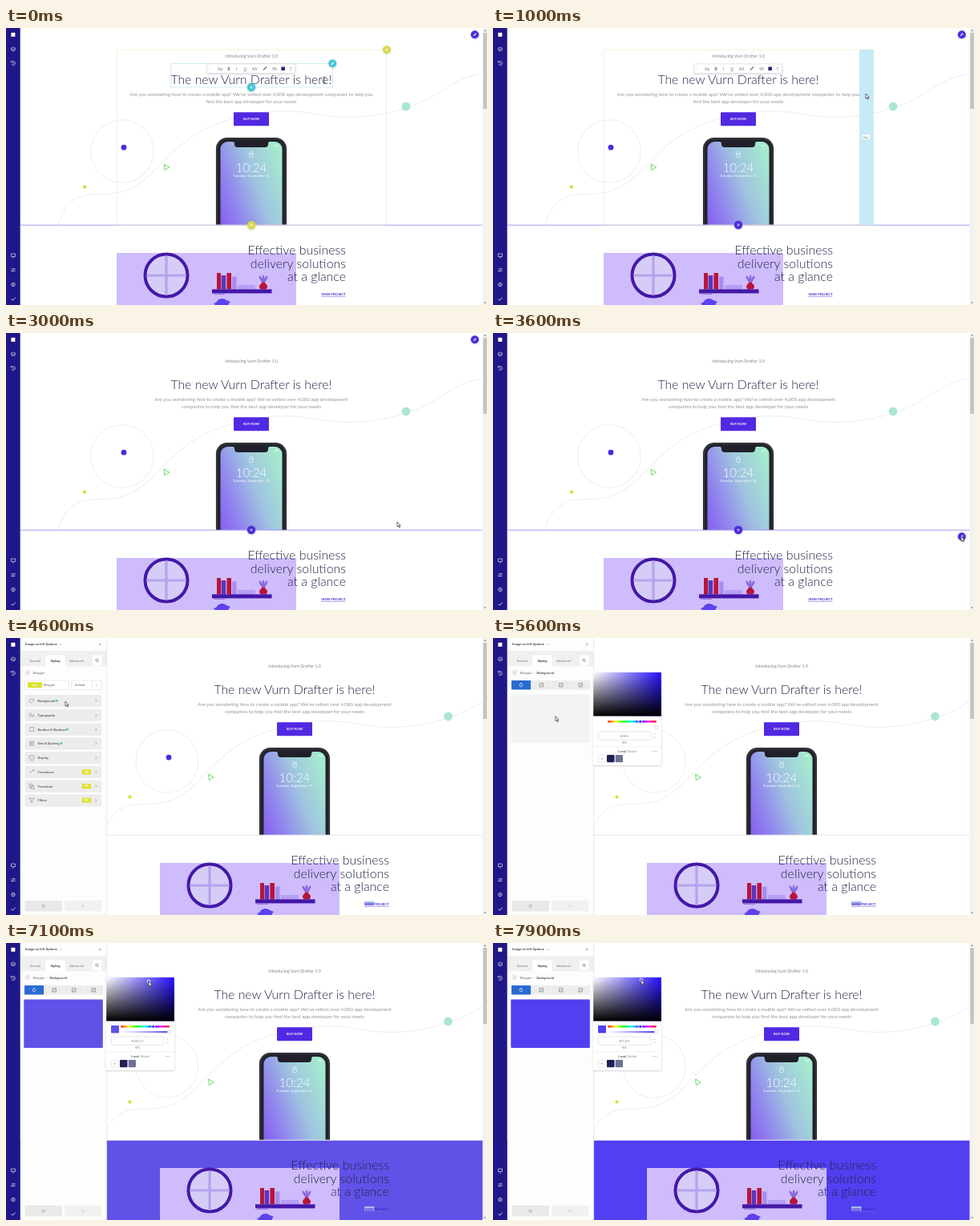
Animation, 600 px wide and 346 px high, one loop 8000 ms. Source, as an HTML page:

```html
<!DOCTYPE html>
<html lang="en">
<head>
<meta charset="utf-8">
<title>Page builder</title>
<style>
html, body { margin: 0; width: 100%; height: 100%; overflow: hidden; background: #fff; }
svg { display: block; width: 100vw; height: 100vh; }
text { font-family: Lato, "Open Sans", sans-serif; }
.ui text { font-family: Roboto, Inter, sans-serif; }
</style>
</head>
<body>
<svg id="stage" viewBox="0 0 600 346" preserveAspectRatio="none"></svg>
<script>
const LOOP = 8000;
const OPEN_PANEL = 3700, OPEN_BACKGROUND = 4950, OPEN_PICKER = 5500, PICK = 5900;
const stage = document.getElementById('stage');

const rect = (x, y, w, h, fill, r = 0, more = '') =>
  `<rect x="${x}" y="${y}" width="${w}" height="${h}" fill="${fill}" rx="${r}" ${more}/>`;
const circle = (x, y, r, fill, more = '') => `<circle cx="${x}" cy="${y}" r="${r}" fill="${fill}" ${more}/>`;
const line = (d, stroke, w = .6, more = '') =>
  `<path d="${d}" fill="none" stroke="${stroke}" stroke-width="${w}" ${more}/>`;
const text = (x, y, size, fill, body, anchor = 'start', weight = 400, more = '') =>
  `<text x="${x}" y="${y}" font-size="${size}" fill="${fill}" text-anchor="${anchor}" font-weight="${weight}" ${more}>${body}</text>`;
const group = (id, body, more = '') => `<g id="${id}" ${more}>${body}</g>`;
const plus = (x, y, fill) => circle(x, y, 5.2, fill, 'filter="url(#soft)"') +
  line(`M${x - 1.6} ${y}h3.2M${x} ${y - 1.6}v3.2`, '#fff', .7);
const pencil = (x, y, fill) => circle(x, y, 5, fill, 'filter="url(#soft)"') +
  line(`M${x - 1.4} ${y + 1.4}l2.8 -2.8`, '#fff', 1.3);

const defs = `<defs>
  <filter id="soft" x="-50%" y="-50%" width="200%" height="200%"><feDropShadow dx="0" dy=".7" stdDeviation="1.2" flood-opacity=".22"/></filter>
  <linearGradient id="screen" x1="0" y1=".85" x2="1" y2=".15">
    <stop offset="0" stop-color="#8452f2"/><stop offset=".32" stop-color="#9187ed"/>
    <stop offset=".62" stop-color="#9fc3e0"/><stop offset="1" stop-color="#a5ebce"/></linearGradient>
  <linearGradient id="tint"><stop offset="0" stop-color="#fff"/><stop offset="1" stop-color="#2410ff"/></linearGradient>
  <linearGradient id="shade" x2="0" y2="1"><stop offset="0" stop-opacity="0"/><stop offset="1"/></linearGradient>
  <linearGradient id="hue">${['#f00', '#ff0', '#0f0', '#0ff', '#00f', '#f0f', '#f00']
    .map((c, i) => `<stop offset="${i / 6}" stop-color="${c}"/>`).join('')}</linearGradient>
  <linearGradient id="alpha"><stop offset="0" stop-color="#fff"/><stop id="alphaEnd" offset="1"/></linearGradient>
  <clipPath id="hero"><rect x="-60" width="720" height="246"/></clipPath>
</defs>`;

const decor = group('decor',
  line('M65 246C70 226 82 209 107 208C141 207 157 206 184 179C211 151 232 129 274 116C316 102 354 101 389 108C434 116 475 109 510 96C548 81 557 63 593 57', '#e4e4e6', .7) +
  circle(145, 154, 39.3, 'none', 'stroke="#e6e6e8" stroke-width=".7"') +
  circle(147, 149.2, 3.4, '#5028df') +
  rect(96, 196.6, 3.9, 3.8, '#d8df3a', .8) +
  line('M197.2 170L203.6 174L197.8 177.6Z', '#54d651', .9) +
  circle(499, 98, 5.4, '#aae6d0'));

const phone = `<g clip-path="url(#hero)">` +
  rect(262, 137, 88, 150, '#20202a', 14, 'filter="url(#soft)"') +
  rect(263.2, 138.2, 85.6, 150, 'none', 13, 'stroke="#54545e" stroke-width=".6"') +
  rect(267.5, 142, 77, 150, 'url(#screen)', 9) +
  '<path d="M283 142h46q-2 0 -2 3q0 4 -4 4h-34q-4 0 -4 -4q0 -3 -2 -3z" fill="#20202a"/>' +
  line('M335 147h5', '#fff', 1, 'opacity=".8"') +
  line('M304 158v-1.6a2 2 0 0 1 4 0v1.6', '#fff', .6) +
  circle(306, 159.5, 2.5, 'none', 'stroke="#fff" stroke-width=".6"') +
  text(306, 179.7, 15.2, '#fff', '10:24', 'middle', 300) +
  text(306, 186.3, 4.5, '#fff', 'Tuesday, September 11', 'middle') + '</g>';

const GREY = '#94949d', INK = '#25254a';
const paragraph = (id, lines) => group(id,
  lines.map((s, i) => text(306, 85 + 8.6 * i, 6.08, GREY, s, 'middle')).join(''));

const copy =
  text(306, 37, 5.3, '#858591', 'Introducing Vurn Drafter 1.0', 'middle') +
  text(306, 70, 15.8, INK, 'The new Vurn Drafter is here!', 'middle', 300) +
  paragraph('wide', ['Are you wondering how to create a mobile app? We’ve vetted over 4,000 app development companies to help you', 'find the best app developer for your needs']) +
  paragraph('narrow', ['Are you wondering how to create a mobile app? We’ve vetted over 4,000 app development', 'companies to help you find the best app developer for your needs']) +
  rect(284, 105.2, 44, 17, '#5129e2', 1) +
  text(306, 115.2, 4.1, '#fff', 'BUY NOW', 'middle', 700);

const leaf = turn => `<ellipse cx="321" cy="313" rx="1.4" ry="4.6" fill="#8a67dc" transform="rotate(${turn} 321 319)"/>`;
const section =
  rect(-100, 246.5, 760, 100, '#fff', 0, 'id="sectionFill"') +
  rect(138, 281, 224, 66, '#cfbcfd') +
  circle(200, 309, 26.5, '#d5cdf8', 'stroke="#4318a6" stroke-width="4"') +
  line('M200 284.5v49M175.5 309h49', '#b6a2ee', 3.2) +
  rect(263, 306, 5, 20.5, '#b8143a') + rect(268.6, 309, 5.6, 17.5, '#5b35bd') +
  rect(275.4, 306, 5.6, 20.5, '#b8143a') + rect(282, 310.5, 5.5, 16, '#a88cf0') +
  rect(289, 321, 22, 5.5, '#b69ef5') +
  [-28, 0, 28].map(leaf).join('') +
  '<path d="M319 317.5h4q0 2 2 3q2.500 3 -1 6h-6q-3.500 -3 -1 -6q2 -1 2 -3z" fill="#b8143a"/>' +
  rect(257, 326.4, 74.5, 5, '#4318a6') + line('M259 332.2h14', '#8f70df', 1.4) +
  '<path d="M259 344q4 -1 5 -4q6 -4 11 0l5 2q-2 1 -3 5h-15z" fill="#5b42ec"/>' +
  [['Effective business', 283], ['delivery solutions', 299.8], ['at a glance', 316.2]]
    .map(([s, y]) => text(424, y, 15.9, INK, s, 'end', 300)).join('') +
  rect(393, 329, 12.5, 5.2, '#a9b9f0', 0, 'id="selection"') +
  text(423.5, 333.6, 4.25, '#4a27cf', 'VIEW PROJECT', 'end', 700) +
  line('M393 335.4h30.5', '#7d66dd', .6);

const tools = group('tools',
  rect(251, 45, 109.500, 11.4, '#fff', 1, 'stroke="#dcdce2" stroke-width=".6" filter="url(#soft)"') +
  [['⁝', 255], ['Aa', 267], ['B', 278, 'font-weight="700"'], ['I', 287.500, 'font-style="italic"'],
   ['U', 298, 'text-decoration="underline"'], ['AA', 310], ['99', 335], ['Ξ', 355]]
    .map(([s, x, more]) => text(x, 52.7, 5, '#70707c', s, 'middle', more && more.includes('weight') ? 700 : 400,
      more && !more.includes('weight') ? more : '')).join('') +
  line('M321 52.500l4 -4', '#70707c', 1.2) + rect(343.4, 48.500, 4.500, 4.500, '#29217e'), 'class="ui"');

const overlays =
  line('M18 246.2H594', '#9f8ff0', .9, 'id="sectionLine"') +
  rect(138, 27, 336.500, 219, 'none', 0, 'id="column" stroke="#ebe9c6" stroke-width=".7"') +
  group('padding', rect(457, 27, 17.500, 219, '#c5ebf7', 0, 'id="paddingFill"') +
    rect(460.500, 133.300, 9.500, 6, '#fff', 1) + text(465.2, 137.800, 3.300, '#777', '50px', 'middle'), 'class="ui"') +
  rect(205.500, 44.500, 202, 29.500, 'none', 0, 'id="headingBox" stroke="#bfe5f0" stroke-width=".7"') +
  tools +
  group('headingTools', pencil(407.300, 44.300, '#45c6d8') + plus(306, 74, '#45c6d8')) +
  group('columnTools', pencil(475, 27, '#d9da4b') + plus(306, 246.300, '#d9da4b')) +
  group('sectionPlus', plus(306, 246, '#4c2edf')) +
  group('sectionPencil', pencil(584.800, 8.200, '#4c2edf'));

const sideIcons =
  rect(6.4, 5.800, 5, 5, '#fff') +
  line('M6 25.500l3 -1.700l3 1.700l-3 1.700zM6 27.200l3 1.700l3 -1.700', '#fff') +
  line('M7 42.500a2.500 2.500 0 1 1 -.3 2.500M6.300 41v1.800h1.800M9 42.800v1.500l1 .8', '#fff') +
  line('M6.500 282h5v3.500h-5zM8 287h2', '#fff') +
  line('M6.300 301h5.400M6.300 303.500h5.400M10 300v2M8 302.500v2', '#fff') +
  circle(9, 320.500, 2.200, 'none', 'stroke="#fff" stroke-width=".7"') + circle(9, 320.500, .7, '#fff') +
  line('M6.600 338.500l1.700 1.700l3.300 -3.600', '#fff', .8);

const chevron = (x, y) => line(`M${x} ${y - 1.500}l1.500 1.500l-1.500 1.500`, '#777');
const down = (x, y) => line(`M${x - 1.300} ${y - .6}l1.300 1.300l1.300 -1.300`, '#777', .5);

// Row: label, end of label when it carries a green dot, paid feature flag
const rows = [['Background', 63.500], ['Typography'], ['Borders &amp; Shadows', 76.500], ['Size &amp; Spacing', 69],
  ['Display'], ['Transitions', 0, true], ['Transform', 0, true], ['Filters', 0, true]];
const glyphs = ['M29 79q0 -3 3 -3t3 2.500q-1 1 -2 .7q-1 2 -2 1.700q-2 0 -2 -1.900z', 'M29 81l1.600 -5l1.600 5M33 81l1.200 -3.500l1.200 3.500',
  'M29.500 76h5v5h-5z', 'M29.500 76h5v5h-5zM31 77.500h2v2h-2z', 'M29 76h6v4h-6zM30 82h4', 'M29 80l6 -4M33 76h2v2',
  'M29 76h4v4h-4zM31 78h4v4h-4z', 'M29 76h6l-2.300 2.800v3l-1.400 -.8v-2.200z'];
const row = ([label, dot, paid], i) => `<g transform="translate(0 ${17.750 * i})">` +
  rect(23.500, 71, 95.500, 15.200, '#ececec', 1.500) + line(glyphs[i], '#8c8c92', .6) +
  text(39.500, 80.100, 4.100, '#55555c', label, 'start', 500) +
  (dot ? circle(dot, 78.400, 1.400, '#4fcb80') : '') +
  (paid ? rect(95, 75.600, 11, 6, '#dfe122', 1) + text(100.500, 79.800, 2.900, '#fff', 'PRO', 'middle', 700) : '') +
  chevron(111.500, 78.600) + '</g>';

const options = group('options',
  rect(23.500, 53, 55, 11.500, '#fff', 1, 'stroke="#dedede" stroke-width=".6"') +
  rect(27, 55.200, 18, 7, '#dce12c', 1) + text(36, 59.800, 2.900, '#fff', 'class', 'middle', 500) +
  text(46.500, 60.200, 4, '#666', 'Wrapper') +
  rect(82, 53, 37, 11.500, '#fff', 1, 'stroke="#dedede" stroke-width=".6"') + line('M107.500 53v11.500', '#dedede') +
  text(86, 60.200, 4, '#666', 'default') + down(113, 58.700) + rows.map(row).join(''));

const background = group('background',
  text(51, 44.600, 3.900, '#777', '›') + text(54.500, 44.600, 4, '#44444c', 'Background', 'start', 500) +
  [23, 48, 72.500, 97].map((x, i) => rect(x, 53, 24.200, 11.500, i ? '#ececec' : '#2a6bd2', 1) +
    (i ? line(`M${x + 10} 56.500h4.500v4.500h-4.500zM${x + 10.500} 60.500l3.500 -3`, '#777') : line('M35 56l1.500 2.300a1.700 1.700 0 1 1 -3 0z', '#fff', .7))).join('') +
  rect(22.300, 70.500, 98.500, 60.500, '#f3f3f3', 1, 'id="preview"'));

const panel = group('panel',
  rect(17.500, 0, 108.300, 346, '#fdfdfd') + rect(17.500, 16, 108.300, 19.300, '#f0f0f1') +
  line('M125.700 0V346', '#dcdce0') +
  text(24, 9.400, 4.150, '#3c3c44', 'Image on left Options', 'start', 500) + down(68.500, 8) +
  line('M115.600 6.600l2.800 2.800m0 -2.800l-2.800 2.800', '#777', .5) +
  rect(49.300, 21.500, 24.500, 14, '#fff', 1) + rect(108, 21.500, 11.500, 12.500, '#fff', 1) +
  text(36.500, 29.600, 4, '#777', 'General', 'middle') + text(61.500, 29.600, 4, '#33333c', 'Styling', 'middle', 500) +
  text(88, 29.600, 4, '#777', 'Advanced', 'middle') +
  circle(113.300, 27.600, 1.500, 'none', 'stroke="#555" stroke-width=".6"') + line('M114.400 28.700l1.300 1.300', '#555') +
  rect(23.700, 39.800, 6.600, 6.600, '#f3eaf0', 2) + line('M27.500 41.700l-1.300 1.400l1.300 1.400', '#999', .5) +
  text(33.500, 44.600, 4, '#666', 'Wrapper') + options + background +
  rect(23.500, 328, 46.500, 13.500, '#e9e9ea', 1) + rect(73, 328, 46, 13.500, '#f1f1f2', 1) +
  circle(46.700, 334.800, 1.600, 'none', 'stroke="#999" stroke-width=".7"') +
  circle(96, 334.800, 1.600, 'none', 'stroke="#d0d0d0" stroke-width=".7"'), 'class="ui"');

const picker = group('picker',
  rect(124.800, 43, 85.200, 116, '#fff', 1.500, 'filter="url(#soft)"') +
  rect(125.200, 43, 84.600, 54.500, 'url(#tint)') + rect(125.200, 43, 84.600, 54.500, 'url(#shade)') +
  circle(0, 0, 1.900, 'none', 'id="ring" stroke="#fff" stroke-width=".8"') +
  rect(131, 103, 10, 9.500, '#fff', 1, 'id="swatch"') +
  rect(143, 103.300, 61, 2.200, 'url(#hue)', 1) + circle(183.700, 104.400, 2.100, '#4a35ea', 'stroke="#fff" stroke-width=".9"') +
  rect(143, 110, 61, 2.200, 'url(#alpha)', 1) +
  circle(203.500, 111.100, 2.300, '#fff', 'stroke="#c5c5cd" stroke-width=".6"') +
  rect(131.200, 117, 65.600, 10.300, '#fff', 1, 'stroke="#dcdce0" stroke-width=".7"') +
  text(164, 123.700, 4, '#85858c', '', 'middle', 400, 'id="hex"') +
  line('M200.200 120.700l1.200 -1.300l1.200 1.300M200.200 123.500l1.200 1.300l1.200 -1.300', '#999', .5) +
  text(164, 132.300, 3.300, '#888', 'HEX', 'middle') + line('M125 135.700h85', '#e8e8ec') +
  text(166, 143, 4, '#55555c', 'Local', 'end', 500) + text(167.500, 143, 4, '#888', 'Global') +
  [199.500, 201.500, 203.500].map(x => circle(x, 141.500, .5, '#888')).join('') +
  rect(131.300, 146.300, 8.700, 8.700, '#fff', 1, 'stroke="#dcdce0" stroke-width=".6"') +
  line('M134.500 150.700h2.400M135.700 149.500v2.400', '#888', .5) +
  rect(142, 146, 9.500, 9.200, '#211e58', 1) + rect(152.700, 146, 9.300, 9.200, '#6d7196', 1), 'class="ui"');

const scrollbar = rect(594.500, 0, 5.500, 346, '#f2f2f2') + rect(595.300, 6, 4.500, 95, '#c2c2c4') +
  '<path d="M596 3.800l1.500 -1.700l1.500 1.700zM596 342.500l1.500 1.700l1.500 -1.700z" fill="#777"/>';

const pointers =
  group('arrow', '<path d="M0 0v6l1.400 -1.200l1 2.300l1 -.4l-1 -2.200h1.800z" fill="#fff" stroke="#222" stroke-width=".65"/>') +
  group('beam', line('M-1.500 -4h3M0 -4v7.500M-1.500 3.500h3', '#333', .7));

stage.innerHTML = defs + rect(0, 0, 600, 346, '#fff') +
  group('page', section + decor + phone + copy) + overlays + scrollbar + panel + picker +
  rect(0, 0, 17.700, 346, '#1f1788') + sideIcons + pointers;

const el = Object.fromEntries([...stage.querySelectorAll('[id]')].map(n => [n.id, n]));
const show = (id, on) => { el[id].style.display = on ? '' : 'none'; };
const set = (id, name, value) => el[id].setAttribute(name, value);

// Pointer route: time, x, y
const route = [[0, 397, 65], [250, 399, 66], [900, 465, 82], [1250, 465, 82], [2000, 450, 84], [2250, 452, 90],
  [3000, 488, 236], [3400, 584, 254], [3750, 584, 254], [4500, 74, 79], [4950, 74, 79],
  [5300, 74, 100], [5550, 74, 100], [5900, 143, 60], [6300, 154, 53], [7100, 178, 48], [7900, 185, 46], [8000, 185, 46]];

function pointerAt(t) {
  const i = Math.max(1, route.findIndex(p => p[0] > t));
  const [a, b] = [route[i - 1], route[i]];
  const u = (t - a[0]) / (b[0] - a[0]);
  const k = t < PICK ? u * u * (3 - 2 * u) : u;
  return [a[1] + (b[1] - a[1]) * k, a[2] + (b[2] - a[2]) * k];
}

function pickColor(x, y) {
  const s = Math.min(1, Math.max(0, (x - 126) / 80));
  const v = 255 * Math.min(1, 1 - (y - 43) / 54);
  const low = v * (1 - s);
  return '#' + [low + (v - low) * .1, low, v].map(c => Math.round(c).toString(16).padStart(2, '0')).join('');
}

function draw(t) {
  const [x, y] = pointerAt(t);
  const open = t >= OPEN_PANEL, inBackground = t >= OPEN_BACKGROUND;
  const inHeading = t < 1000 && x < 408, inColumn = t < 2600 && x < 474 && y < 246;
  const onPadding = inColumn && (t >= 900 || x >= 457);
  const grow = t < 1250 ? 0 : Math.max(0, Math.min(15, 465 - x));
  const color = t >= PICK ? pickColor(x, y) : '#ffffff';

  set('page', 'transform', open ? 'translate(54 0)' : '');
  set('decor', 'transform', open ? 'translate(3.500 0) scale(.99 1)' : '');
  show('wide', grow < 6 && t < 2000);
  show('narrow', grow >= 6 || t >= 2000);

  show('headingBox', inHeading);
  show('headingTools', inHeading);
  show('tools', inColumn);
  show('column', inColumn);
  show('columnTools', inColumn && !onPadding);
  show('padding', onPadding);
  set('paddingFill', 'x', 457 - grow);
  set('paddingFill', 'width', 17.5 + grow);
  show('sectionPlus', !open && !(inColumn && !onPadding));
  show('sectionPencil', !open);
  set('sectionPencil', 'transform', t >= 3150 ? 'translate(0 246)' : '');
  set('sectionLine', 'stroke', open ? '#e4e4e8' : '#9f8ff0');
  show('selection', open);

  show('panel', open);
  show('options', !inBackground);
  show('background', inBackground);
  show('picker', t >= OPEN_PICKER);
  set('sectionFill', 'fill', color);
  set('preview', 'fill', t >= PICK ? color : '#f3f3f3');
  set('swatch', 'fill', color);
  set('alphaEnd', 'stop-color', color);
  el.hex.textContent = color;
  show('ring', t >= PICK);
  set('ring', 'transform', `translate(${x} ${y})`);

  show('beam', inHeading);
  show('arrow', !inHeading);
  set('beam', 'transform', `translate(${x} ${y})`);
  set('arrow', 'transform', `translate(${x} ${y})`);
}

const start = performance.now();
function frame() {
  draw((performance.now() - start) % LOOP);
  requestAnimationFrame(frame);
}
draw(0);
requestAnimationFrame(frame);
</script>
</body>
</html>
```
